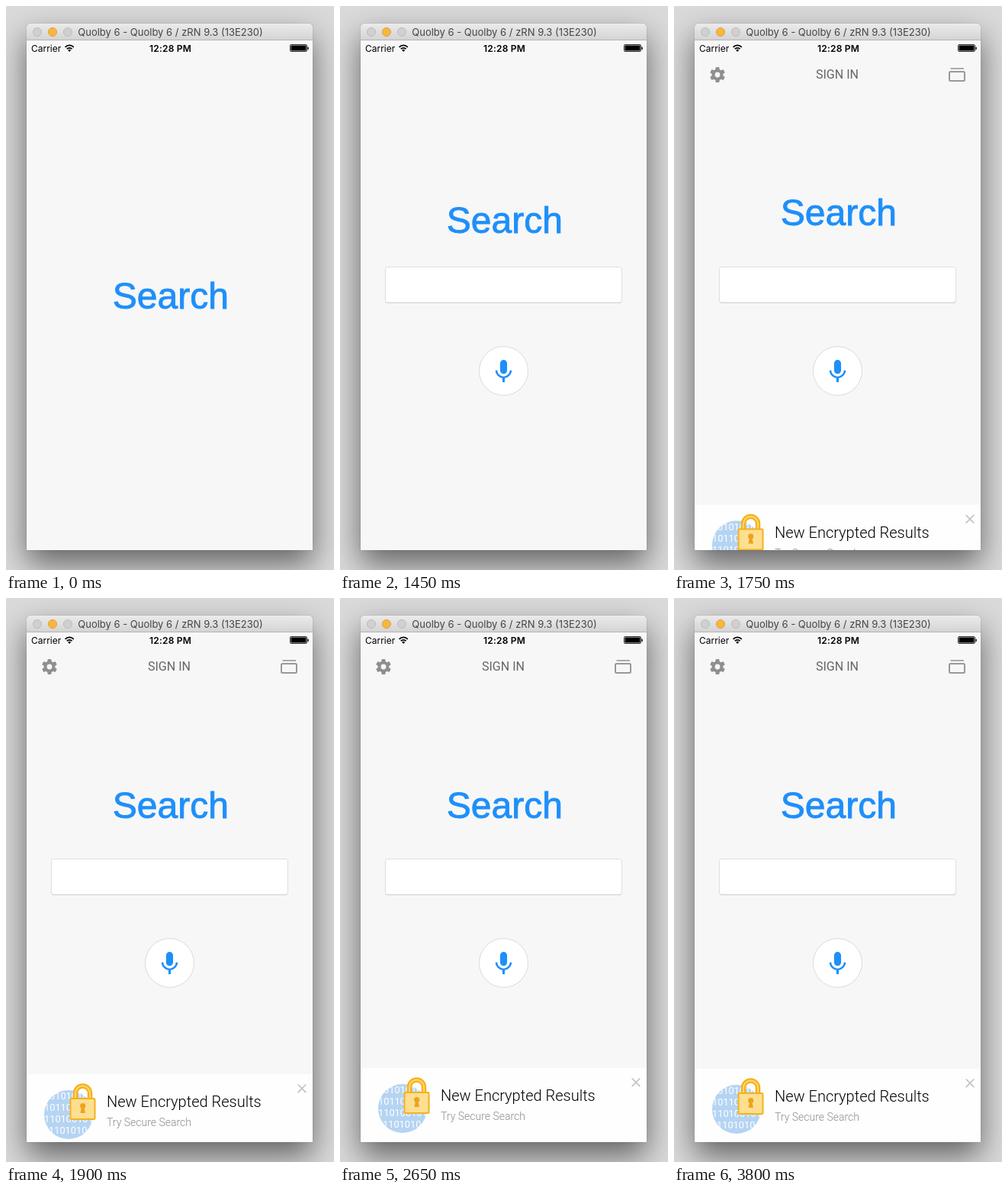
Recreate the animation shown at these times as an HTML page. Size 430x738 px, loop 3850 ms.

```html
<!DOCTYPE html>
<html lang="en">
<head>
<meta charset="utf-8">
<title>Search launch animation</title>
<style>
  html, body { margin: 0; width: 100%; height: 100%; overflow: hidden; background: #dadada; }
  #shadow {
    position: absolute; left: 27px; top: 23px; width: 375px; height: 689px;
    border-radius: 5px 5px 0 0;
    box-shadow: 0 18px 40px rgba(0, 0, 0, .55), 0 0 1px rgba(0, 0, 0, .5);
  }
  svg { position: absolute; left: 0; top: 0; }
  .ui { font-family: Inter, sans-serif; }
  .app { font-family: Roboto, sans-serif; }
</style>
</head>
<body>
<div id="shadow"></div>
<svg width="430" height="738" viewBox="0 0 430 738">
  <defs>
    <linearGradient id="bar" x2="0" y2="1">
      <stop stop-color="#ebebeb"/><stop offset="1" stop-color="#d3d3d3"/>
    </linearGradient>
    <clipPath id="screen"><rect x="27" y="45" width="375" height="667"/></clipPath>
    <clipPath id="disc"><circle cx="82" cy="669" r="32"/></clipPath>
    <path id="tooth" d="M-2.9-6 L-2.2-10 H2.2 L2.9-6Z"/>
  </defs>

  <!-- Simulator window -->
  <path d="M27 45V28a5 5 0 0 1 5-5H397a5 5 0 0 1 5 5V45Z" fill="url(#bar)"/>
  <rect x="27" y="44" width="375" height="1" fill="#b4b4b4"/>
  <g fill="#d0d0d0" stroke="#bcbcbc">
    <circle cx="41" cy="34" r="5.5"/>
    <circle cx="61" cy="34" r="5.5" fill="#f6b740" stroke="#dfa136"/>
    <circle cx="81" cy="34" r="5.5"/>
  </g>
  <text class="ui" x="215.5" y="39" font-size="13" text-anchor="middle" fill="#444">Quolby 6 - Quolby 6 / zRN 9.3 (13E230)</text>

  <g clip-path="url(#screen)">
    <rect x="27" y="45" width="375" height="667" fill="#f7f7f7"/>

    <!-- Status bar -->
    <g class="ui" font-size="12">
      <text x="33" y="59.5">Carrier</text>
      <text x="215.5" y="59.5" font-weight="600" letter-spacing=".2" text-anchor="middle">12:28 PM</text>
    </g>
    <g fill="none" stroke="#000" stroke-width="1.7">
      <path d="M77.6 53.8a7.8 7.8 0 0 1 11.2 0M79.8 56.2a4.8 4.8 0 0 1 6.8 0"/>
      <path d="M83.2 60l-2-2.2a2.9 2.9 0 0 1 4 0Z" fill="#000" stroke="none"/>
    </g>
    <rect x="372.5" y="50.5" width="22" height="9" rx="1.5" fill="none" stroke="#000" stroke-width=".8"/>
    <rect x="373.5" y="51.5" width="20" height="7" rx=".5"/>
    <rect x="395.5" y="53.5" width="1.3" height="3.5" rx=".6"/>

    <g id="toolbar">
      <g transform="translate(57 90)" fill="#8f8f8f">
        <circle r="5.4" fill="none" stroke="#8f8f8f" stroke-width="4"/>
        <use href="#tooth"/><use href="#tooth" transform="rotate(60)"/>
        <use href="#tooth" transform="rotate(120)"/><use href="#tooth" transform="rotate(180)"/>
        <use href="#tooth" transform="rotate(240)"/><use href="#tooth" transform="rotate(300)"/>
      </g>
      <text class="app" x="186" y="95" font-size="16" fill="#666">SIGN IN</text>
      <rect x="361" y="86" width="20" height="12" rx="1.5" fill="none" stroke="#999" stroke-width="2"/>
      <rect x="362.5" y="81" width="17.5" height="1.6" fill="#999"/>
    </g>

    <text id="logo" x="139.8" y="396" font-family="Liberation Sans, Arial, sans-serif" font-size="48"
      fill="#1e8ffa" stroke="#1e8ffa" stroke-width=".9">Search</text>

    <g id="controls">
      <rect x="59.5" y="342" width="310" height="47" rx="3" fill="#cfcfcf"/>
      <rect x="59.5" y="341.5" width="310" height="46.5" rx="3" fill="#fff" stroke="#dedede"/>
      <circle cx="214.5" cy="477.5" r="32" fill="#fff" stroke="#dadada"/>
      <path transform="translate(196.1 460) scale(1.53)" fill="#1e8ffa"
        d="M12 14a3 3 0 0 0 3-3V5a3 3 0 0 0-6 0v6a3 3 0 0 0 3 3zm5.3-3c0 3-2.54 5.1-5.3 5.1S6.7 14 6.7 11H5c0 3.41 2.72 6.23 6 6.72V21h2v-3.28c3.28-.48 6-3.3 6-6.72z"/>
    </g>

    <g id="card" class="app" font-weight="300">
      <rect x="27" y="616" width="375" height="110" fill="#fefefe"/>
      <circle cx="82" cy="669" r="32" fill="#b5d4f3"/>
      <g clip-path="url(#disc)" font-size="12.8" fill="#fff" font-weight="400">
        <text x="57" y="649">01010101</text>
        <text x="50" y="664">101101101</text>
        <text x="50" y="679">110100101</text>
        <text x="56" y="693.5">1101010</text>
      </g>
      <g fill="none" stroke="#f6b11a">
        <path id="shackle" d="M91 649V641a9.5 9.5 0 0 1 19 0V649" stroke-width="6.5"/>
        <path d="M91 649V641a9.5 9.5 0 0 1 19 0V649" stroke="#ffd774" stroke-width="2"/>
        <rect x="84.5" y="648" width="32" height="27" rx="1.5" fill="#fddf92" stroke-width="2"/>
      </g>
      <path d="M99.3 658h2.8l1.8 9h-6.4Z" fill="#eea21c"/>
      <circle cx="100.7" cy="657.5" r="3.6" fill="#eea21c"/>
      <text x="132" y="659" font-size="20">New Encrypted Results</text>
      <text x="132" y="684" font-size="14" fill="#8c8c8c">Try Secure Search</text>
      <path d="M382.7 629.5l10.6 10.6m0-10.6l-10.6 10.6" stroke="#c2c2c2" stroke-width="1.7"/>
    </g>
  </g>
</svg>
<script>
const LOOP = 3850, STEP = 50, CARD_HEIGHT = 96, LOGO_RISE = 108;
const [toolbar, logo, controls, card] =
  ['toolbar', 'logo', 'controls', 'card'].map(id => document.getElementById(id));

// [time in ms, visible card height in px]
const cardPath = [[1500, 0], [1550, 2], [1600, 12], [1650, 28], [1700, 46], [1800, 73],
  [1900, 89], [2000, 95.5], [2100, 97.5], [2250, 98.2], [2450, 97.8], [2650, 97], [2950, 96]];

const fade = (t, start, end) => Math.min(1, Math.max(0, (t - start) / (end - start)));

// Underdamped spring from 0 to 1, seconds since release
function spring(s, decay = 7.5, freq = 5.5) {
  if (s <= 0) return 0;
  return 1 - Math.exp(-decay * s) * (Math.cos(freq * s) + decay / freq * Math.sin(freq * s));
}

function along(path, t) {
  const i = path.findIndex(p => p[0] > t);
  if (i === 0) return path[0][1];
  if (i < 0) return path[path.length - 1][1];
  const [t0, v0] = path[i - 1], [t1, v1] = path[i];
  return v0 + (v1 - v0) * (t - t0) / (t1 - t0);
}

function draw(now) {
  const t = Math.floor(now % LOOP / STEP) * STEP;
  logo.setAttribute('transform', `translate(0 ${-LOGO_RISE * spring((t - 1110) / 1000)})`);
  controls.setAttribute('opacity', fade(t, 1200, 1450));
  toolbar.setAttribute('opacity', fade(t, 1450, 1600));
  card.setAttribute('transform', `translate(0 ${CARD_HEIGHT - along(cardPath, t)})`);
  requestAnimationFrame(draw);
}
draw(performance.now());
</script>
</body>
</html>
```
